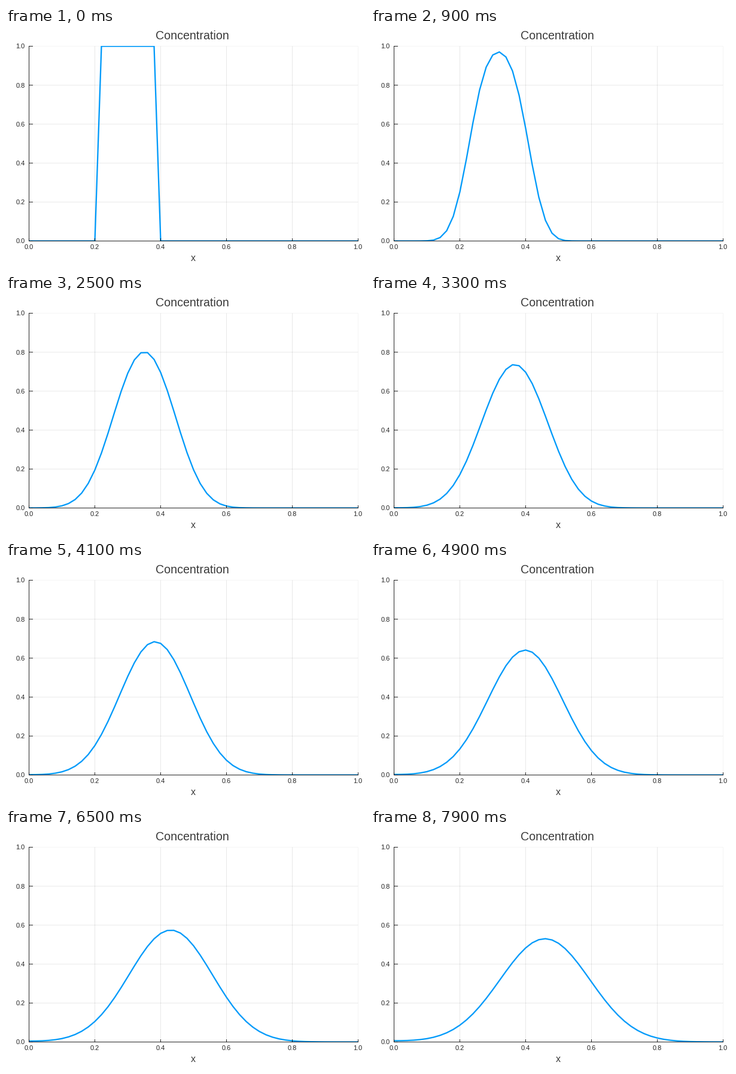
A matplotlib script that plays this animation: 600x400 px, repeating every 8 s.

```python
import numpy as np
import matplotlib.pyplot as plt
from matplotlib.animation import FuncAnimation
from matplotlib.patches import Rectangle

W, H, DPI = 600, 400, 100
PX = 72 / DPI  # points per pixel
LEFT, BASE, WIDTH, HEIGHT = 38.5, 356.5, 550, 326
FRAMES, INTERVAL = 80, 100
DIFFUSION, COURANT = 0.25, 0.1  # per step, in grid units
INK = (0, 0, 0, 0.85)

plt.rcParams["font.family"] = "Liberation Sans"
plt.rcParams["path.snap"] = False


def step(u):
    """One explicit advection-diffusion step with zero-gradient ends."""
    p = np.pad(u, 1, mode="reflect")
    spread = DIFFUSION * (p[2:] - 2 * u + p[:-2])
    drift = COURANT * (p[2:] - p[:-2]) / 2
    return u + spread - drift


def to_x(v):
    return LEFT + WIDTH * v


def to_y(v):
    return BASE - HEIGHT * v


x = np.linspace(0, 1, 51)
states = [np.where((x > 0.21) & (x < 0.39), 1.0, 0.0)]
for _ in range(FRAMES - 1):
    states.append(step(states[-1]))

# The axes span the whole figure, in pixels with y pointing down.
fig = plt.figure(figsize=(W / DPI, H / DPI), dpi=DPI, facecolor="white")
ax = fig.add_axes([0, 0, 1, 1], xlim=(0, W), ylim=(H, 0))
ax.axis("off")


def rule(x0, y0, x1, y1, color, z):
    ax.plot([x0, x1], [y0, y1], color=color, lw=PX, zorder=z,
            solid_capstyle="butt")


def label(px, py, text, size, color, ha="center"):
    ax.text(px, py, text, fontsize=size * PX, color=color,
            ha=ha, va="baseline")


right, top = to_x(1), to_y(1)
for t in np.linspace(0, 1, 6):
    tx, ty = to_x(t), to_y(t)
    if t > 0:
        grid = (0, 0, 0, 0.04 if t == 1 else 0.09)
        rule(tx, BASE, tx, top, grid, 1)
        rule(LEFT, ty, right, ty, grid, 1)
    rule(tx, BASE, tx, BASE - 4.5, INK, 3)
    rule(LEFT, ty, LEFT + 6.5, ty, INK, 3)
    label(tx - 0.5, 370, f"{t:.1f}", 11, "#222222")
    label(31.5, ty + 4, f"{t:.1f}", 11, "#222222", "right")

rule(LEFT, BASE + 0.5, LEFT, top - 0.5, INK, 3)
rule(LEFT, BASE, right + 0.5, BASE, INK, 3)
label(311, 19, "Concentration", 19.7, "#3a3a3a")
label(313, 390, "x", 16, "#3a3a3a")

curve, = ax.plot(to_x(x), to_y(states[0]), color="#009AFA",
                 lw=2.3 * PX, zorder=2)
curve.set_clip_path(Rectangle((LEFT - 0.5, top - 0.5), WIDTH + 1, HEIGHT + 1,
                              transform=ax.transData))


def update(i):
    curve.set_ydata(to_y(states[i]))
    return curve,


anim = FuncAnimation(fig, update, frames=FRAMES, interval=INTERVAL,
                     repeat=True, repeat_delay=0)
plt.show()
```
